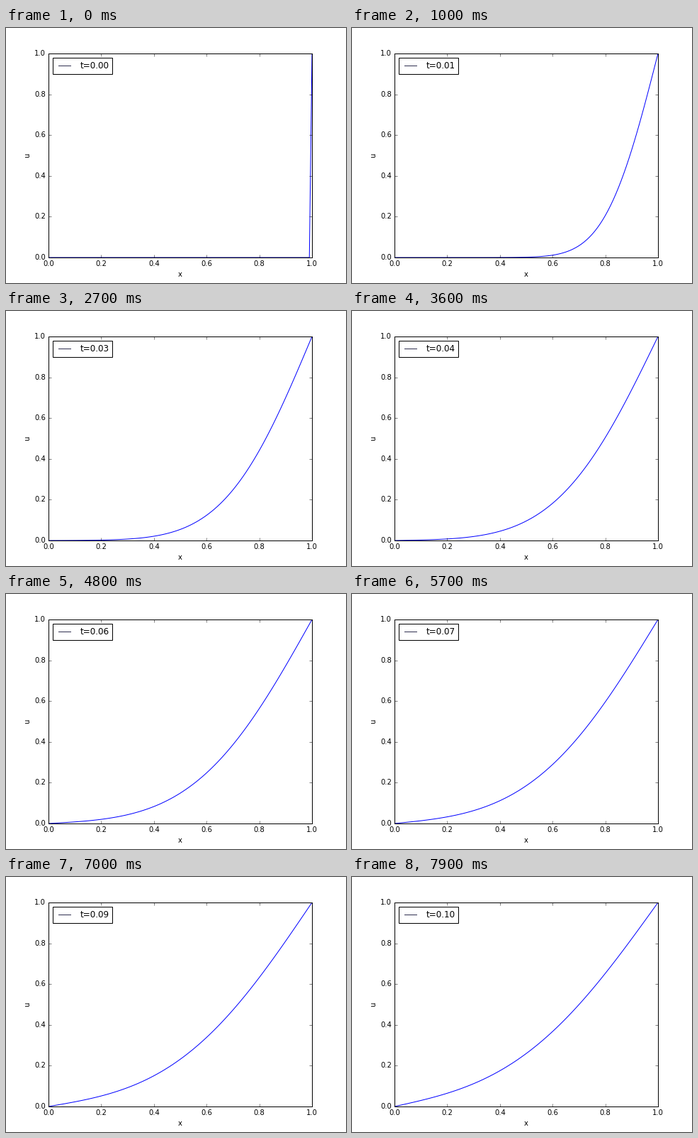
A matplotlib script for the animation above (8 s loop, 480 by 360 pixels).

```python
import math

import matplotlib.pyplot as plt
import numpy as np
from matplotlib.animation import FuncAnimation

FRAMES = 80
STEPS_PER_UNIT = 800  # simulation time advances 1/800 per frame

plt.style.use("classic")
plt.rcParams.update({
    "font.family": "DejaVu Sans",
    "font.size": 10,
    "figure.dpi": 72,
    "savefig.dpi": "figure",
    "legend.fontsize": 12,
})

x = np.linspace(0, 1, 101)
erfc = np.vectorize(math.erfc)


def heat(t):
    """Heat equation on [0, 1] with u(0) = 0, u(1) = 1, zero at the start."""
    if t == 0:
        return np.where(x == 1, 1.0, 0.0)
    s = 2 * math.sqrt(t)
    return sum(erfc((m - x) / s) - erfc((m + x) / s) for m in (1, 3, 5))


fig, ax = plt.subplots(figsize=(480 / 72, 360 / 72), dpi=72, facecolor="white")
ax.set(xlim=(0, 1), ylim=(0, 1), xlabel="x", ylabel="u")
line, = ax.plot(x, heat(0), color="blue", lw=1, label="t=0.00")
legend = ax.legend(loc="upper left")
legend.get_lines()[0].set_color("#303050")
label = legend.get_texts()[0]


def update(k):
    t = k / STEPS_PER_UNIT
    line.set_ydata(heat(t))
    label.set_text(f"t={t:.2f}")
    return line, label


anim = FuncAnimation(fig, update, frames=FRAMES, interval=100,
                     repeat=True, repeat_delay=0, blit=False)
plt.show()
```
